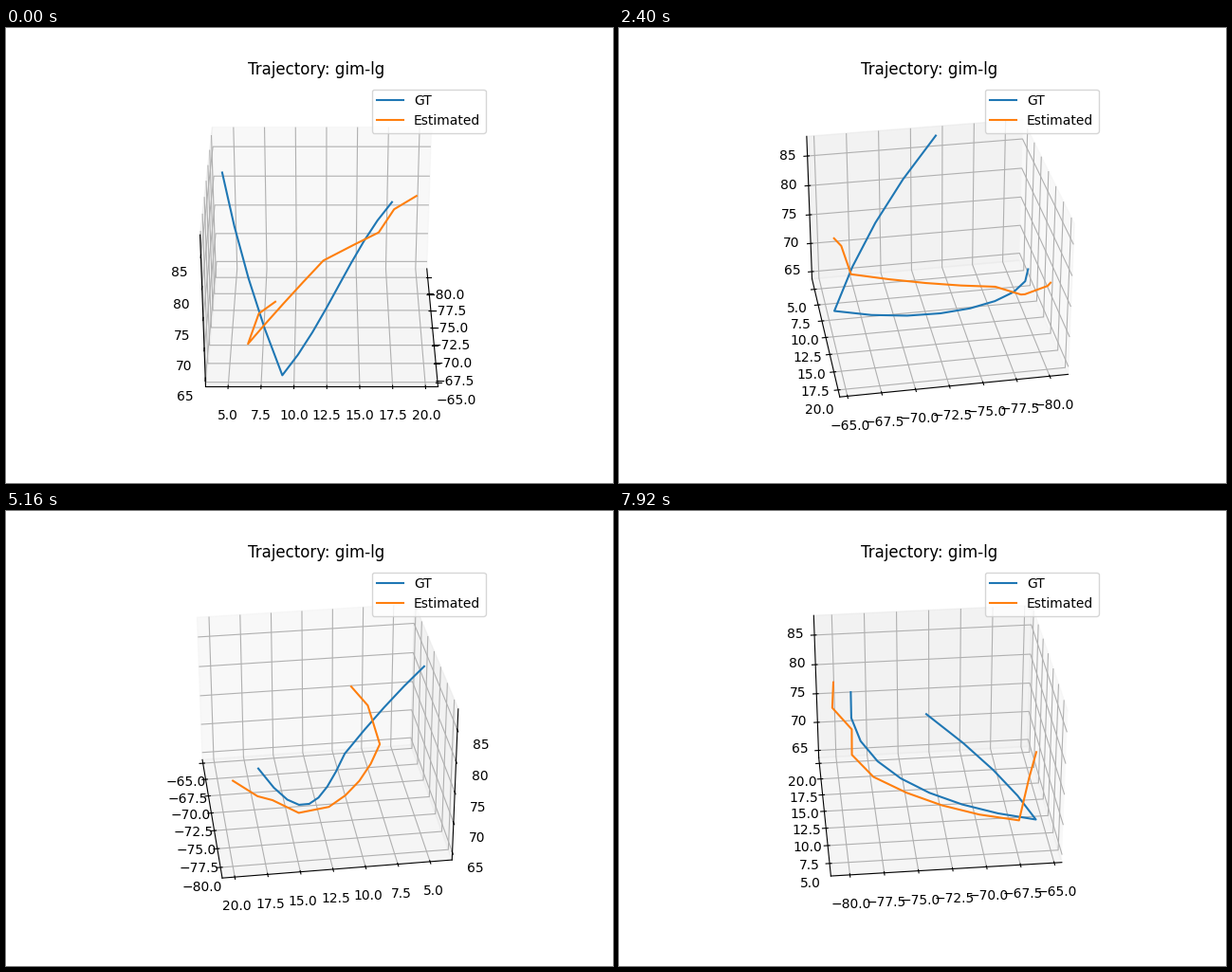
A matplotlib script that plays this animation: 640 by 480 pixels, repeating every 8000 ms.

```python
from math import comb

import numpy as np
import matplotlib.pyplot as plt
from matplotlib.animation import FuncAnimation

TICK = 40            # ms between drawn frames
LOOP = 8000          # ms per loop
STEP = 120           # ms each view is held
TURN = 4             # degrees per step


def bezier(*ctrl, parts):
    """Sample a Bezier curve of any degree as a polyline."""
    n = len(ctrl) - 1
    t = np.linspace(0, 1, parts + 1)
    basis = [comb(n, k) * t**k * (1 - t)**(n - k) for k in range(n + 1)]
    return np.transpose(basis) @ np.array(ctrl)


# True path: a steep fall to a corner, then one long rising curve
corner = (-65.52, 9.10, 64.21)
gt = np.vstack([
    bezier((-74.29, 4.42, 87.77), (-68.48, 6.26, 75.98), corner, parts=4),
    bezier(corner, (-72.91, 12.34, 63.60), (-80.03, 14.64, 69.10),
           (-78.85, 17.79, 78.18), parts=8),
])

# Estimated path: a short drop, a shallow curve, a ragged climb
estimated = np.vstack([
    [(-65.72, 8.64, 76.20), (-66.40, 7.36, 73.45)],
    bezier((-67.21, 6.45, 67.40), (-73.00, 8.79, 66.80),
           (-77.58, 12.25, 69.47), parts=4),
    [(-79.04, 14.79, 70.64), (-78.90, 16.76, 72.90),
     (-80.30, 18.04, 75.42), (-80.08, 19.83, 77.95)],
])

fig = plt.figure(figsize=(6.4, 4.8), dpi=100)
ax = fig.add_subplot(projection="3d")
ax.plot(*gt.T, label="GT")
ax.plot(*estimated.T, label="Estimated")
ax.set(xlim=(-81.385, -64.44), ylim=(3.29, 20.95), zlim=(63.70, 88.26))
ax.set_title("Trajectory: gim-lg", x=0.4973)
ax.legend(loc="upper right")


def update(i):
    ax.view_init(elev=30, azim=TURN * (i * TICK // STEP))
    return []


anim = FuncAnimation(fig, update, frames=LOOP // TICK, interval=TICK,
                     init_func=lambda: update(0), repeat=True, repeat_delay=0)
plt.show()
```
